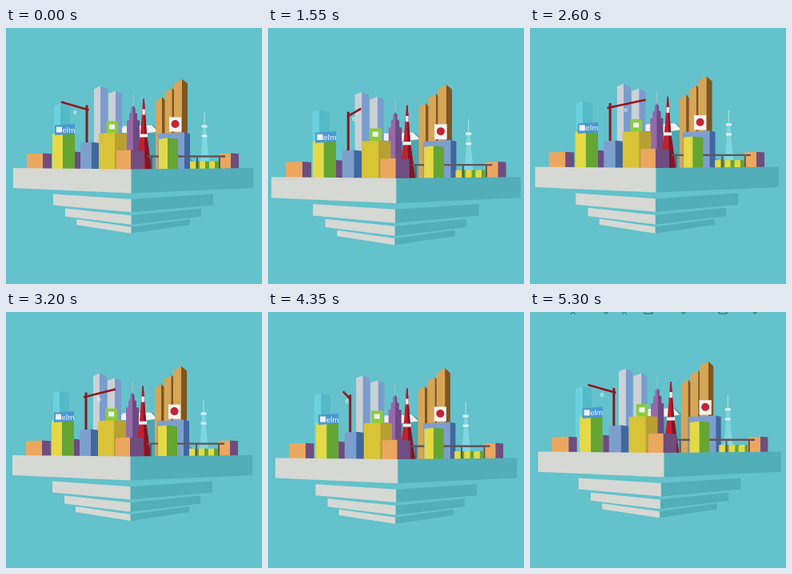
An HTML page with a canvas for the animation above (5350 ms loop, 320x320 px).

```html
<!DOCTYPE html>
<html lang="en">
<head>
<meta charset="utf-8">
<title>Floating city</title>
<style>
html, body { margin: 0; width: 100%; height: 100%; overflow: hidden; background: #63c2cb; }
canvas { display: block; width: 320px; height: 320px; }
</style>
</head>
<body>
<canvas id="stage"></canvas>
<script>
const LOOP = 5350, MIDDLE = 159, GROUND = 177, SKY = '#63c2cb';
const canvas = document.getElementById('stage');
const ratio = window.devicePixelRatio || 1;
canvas.width = canvas.height = 320 * ratio;
const ctx = canvas.getContext('2d');
ctx.scale(ratio, ratio);

// Eased swing through key points [time, value]
function swing(t, ...keys) {
  const i = Math.max(1, keys.findIndex(([time]) => t < time));
  const [t0, a] = keys[i - 1], [t1, b] = keys[i];
  return a + (b - a) * (1 - Math.cos(Math.PI * (t - t0) / (t1 - t0))) / 2;
}

let pose;
function poseAt(t) {
  const sway = (start, near, far, end) => swing(t, [0, start], [1800, near], [3200, far], [LOOP, end]);
  return {
    zoom: sway(1, 1.04, 1, 1.013),
    pan: sway(0, 1, -1, 3),
    turn: sway(0, 3, 0, 8),
    level: swing(t, [0, 176.5], [1700, 188], [2650, 175], [3800, 187], [LOOP, 176]),
    arm: 6 - 38 * Math.cos(2 * Math.PI * t / LOOP)
  };
}

// depth: 1 at the front corner, 0 at the side corners, -1 at the back
const px = (x, depth) => MIDDLE + pose.zoom * (x - MIDDLE) + pose.pan + pose.turn * depth;
const py = y => pose.level + pose.zoom * (y - GROUND);

// Points are [x, y] or [x, y, own depth]
function trace(points, depth) {
  ctx.beginPath();
  for (const [x, y, d = depth] of points) ctx.lineTo(px(x, d), py(y));
}

function poly(color, depth, ...points) {
  trace(points, depth);
  ctx.fillStyle = color;
  ctx.fill();
}

function line(color, width, depth, ...points) {
  trace(points, depth);
  ctx.strokeStyle = color;
  ctx.lineWidth = width;
  ctx.stroke();
}

function rect(color, depth, x, y, w, h) {
  poly(color, depth, [x, y], [x + w, y], [x + w, y + h], [x, y + h]);
}

function label(text, size, depth, x, y) {
  ctx.fillStyle = '#eef6fa';
  ctx.font = `${size * pose.zoom}px Lato, "Open Sans", sans-serif`;
  ctx.fillText(text, px(x, depth), py(y));
}

function block(left, edge, right, top, [front, side], depth, slope = (GROUND - top) * 0.035) {
  const drop = top + slope, near = depth + 0.1;
  poly(side, depth, [edge - 0.4, top, near], [right, drop], [right, GROUND], [edge - 0.4, GROUND, near]);
  poly(front, depth, [left, drop], [edge, top, near], [edge, GROUND, near], [left, GROUND]);
}

const orange = ['#eca75f', '#6f4d7e'], yellow = ['#d8c436', '#b8a033'],
  lime = ['#e4d946', '#64a533'], blue = ['#7d9fce', '#41679f'],
  pale = ['#cbd1d6', '#7b9ccc'], purple = ['#9669aa', '#6d4a82'],
  aqua = ['#6ad2de', '#55bac7'], brown = ['#d6a658', '#80551f'];
const white = '#eef3f2';

function skyline() {
  poly('#4ba7b1', -0.8, [82, 177], [145, 124], [184, 122], [246, 177]);
  poly(white, -0.8, [140, 131], [147, 123], [182, 122], [190, 130], [166, 133]);
  block(60, 68, 80, 95, aqua, -0.6);
  block(110, 118, 127, 73, pale, -0.17);
  block(128, 137, 145, 79, pale, -0.17);

  line('#aebccb', 1, -0.35, [159, 83], [159, 97]);
  for (const half of [2.5, 5, 8]) block(159 - half, 159, 159 + half, 90 + half * 3, purple, -0.35);

  for (let i = 0; i < 3; i++) {
    const left = 187 + 11.5 * i;
    block(left, left + 8 + i, left + 13 + 2 * i, 86 - 11 * i, brown, -0.2, 6);
  }

  line('#a5dfe7', 1.2, -0.6, [248, 106], [248, 124]);
  poly('#7fd6e1', -0.6, [246, 121], [250, 121], [251, 140], [255, 177], [242, 177], [245.5, 140]);
  for (const y of [122, 134]) rect('#d5eff2', -0.6, 244.5, y, 7, 3);
}

function redTower() {
  poly('#c41f2c', 0.1, [171.3, 89], [172.7, 89], [176, 133], [182, 177], [162, 177], [168, 133]);
  poly('#821526', 0.1, [172, 89], [172.7, 89], [176, 133], [182, 177], [174, 177]);
  rect(white, 0.1, 170.4, 102, 3.4, 7);
  rect(white, 0.1, 167, 133, 10, 4);
}

function crane() {
  const depth = 0.2, mast = 101, red = '#93151f';
  line(red, 3, depth, [mast, 97], [mast, 165]);
  line(red, 2.6, depth, [mast - pose.arm * 0.08, 103], [mast + pose.arm, 93]);
  label('e', 9, depth, mast + pose.arm * 0.45 - 2.5, 108);
}

function signs() {
  poly('#4a98d2', 0.35, [61, 122], [86, 120.5], [86, 133], [61, 134.5]);
  rect(white, 0.35, 63, 124, 7, 7);
  label('elm', 10, 0.35, 70.5, 131);
  rect('#8ccb3c', 0.6, 125.5, 117, 14.5, 15);
  rect(white, 0.6, 129, 121, 7, 6);
  rect('#f4f4f2', 0.5, 204, 112, 15, 18);
  ctx.beginPath();
  ctx.arc(px(211.5, 0.5), py(120.5), 5, 0, Math.PI * 2);
  ctx.fillStyle = '#c02434';
  ctx.fill();
}

function town() {
  skyline();
  redTower();
  crane();
  block(26, 46, 57, 157, orange, 0);
  block(77, 85, 94, 155, purple, 0.5);
  block(58, 71, 86, 131, lime, 0.3);
  block(93, 107, 117, 143, blue, 0.45);
  block(116, 136, 151, 131, yellow, 0.65);
  block(190, 223, 230, 131, blue, 0.6);
  signs();

  for (let x = 230; x < 260; x += 12) block(x, x + 7, x + 13, 167, lime, 0.3);
  block(266, 281, 291, 157, orange, 0.2);
  const road = '#5f555e';
  for (const x of [182, 239, 267]) line(road, 2, 0.3, [x, 161], [x, 177]);
  line(road, 2.4, 0.3, [177, 161], [274, 161]);
  block(191, 202, 215, 138, lime, 0.67);
  block(138, 156, 173, 153, orange, 0.87);
}

// The nearer a tier's corner, the lower perspective pushes it
function tier(half, top, bottom) {
  const reach = half / 150, corner = 156.5, depth = reach ** 1.5;
  const nearer = y => y + (y - 168) * 0.2 * Math.sqrt(reach);
  const face = (color, x) => poly(color, 0, [corner, nearer(top), depth], [x, top],
    [x, bottom], [corner, nearer(bottom), depth]);
  face('#52aeb9', MIDDLE + half);
  face('#d6d8d3', MIDDLE - half);
}

function island() {
  tier(150, 175.5, 200.5);
  tier(100, 208, 222);
  tier(85, 226, 236);
  tier(71, 239.5, 246.5);
}

// Lower ends of a heading cut off by the top edge
function heading() {
  ctx.strokeStyle = '#30545d';
  ctx.lineWidth = 1;
  ctx.beginPath();
  for (const x of [54, 118]) {
    ctx.moveTo(x - 1, 0); ctx.lineTo(x - 3, 3);
    ctx.moveTo(x, 0); ctx.lineTo(x + 3, 3);
  }
  for (const x of [95, 192, 281]) {
    ctx.moveTo(x + 2, 0);
    ctx.arc(x, 0, 2, 0, Math.PI);
  }
  for (const x of [148, 241]) {
    ctx.moveTo(x - 5, 0); ctx.lineTo(x - 5, 2);
    ctx.lineTo(x + 5, 2); ctx.lineTo(x + 5, 0);
  }
  ctx.stroke();
}

function draw(now) {
  const t = now % LOOP;
  pose = poseAt(t);
  ctx.fillStyle = SKY;
  ctx.fillRect(0, 0, 320, 320);
  town();
  island();
  if (t >= 4700) heading();
  requestAnimationFrame(draw);
}

draw(0);
</script>
</body>
</html>
```
